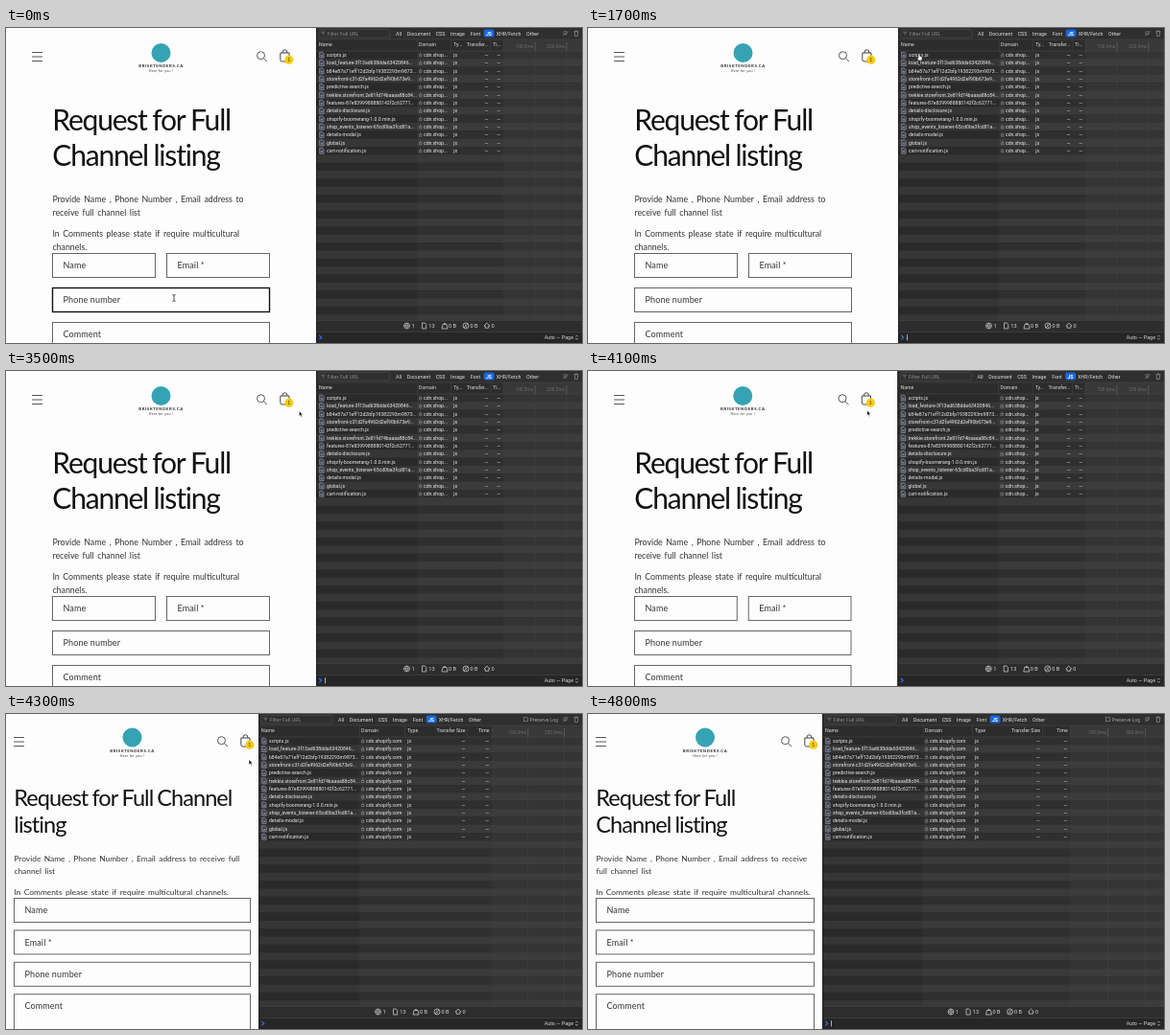
Animation, 600 px wide and 329 px high, one loop 5000 ms. Source, as an HTML page with a canvas:

```html
<!DOCTYPE html>
<html lang="en">
<head>
<meta charset="utf-8">
<title>Request form beside a network inspector</title>
<style>
html, body { margin: 0; height: 100%; overflow: hidden; background: #fdfdfd; }
canvas { display: block; width: 600px; height: 329px; }
</style>
</head>
<body>
<canvas id="stage"></canvas>
<script>
const W = 600, H = 329, LOOP = 5000, TICK = 100;
const canvas = document.getElementById('stage');
const dpr = window.devicePixelRatio || 1;
canvas.width = W * dpr;
canvas.height = H * dpr;
const c = canvas.getContext('2d');

const PAGE = 'Lato, sans-serif', UI = 'Roboto, sans-serif';
const FILES = [
  'scripts.js', 'load_feature-3f13ad638dda63420846...', 'b84e87a71eff12d2bfp19382293m9873...',
  'storefront-c31d2fa4962d2ef90b673e9...', 'predictive-search.js',
  'trekkie.storefront.2e81fd74baaaa88c84...', 'features-87e8399988880142f2c62771...',
  'details-disclosure.js', 'shopify-boomerang-1.0.0.min.js',
  'shop_events_listener-65cd0ba3fcd81a...', 'details-modal.js', 'global.js', 'cart-notification.js'
];
const FILTERS = [['All', 86], ['Document', 107], ['CSS', 129.5], ['Image', 147.5],
  ['Font', 166], ['XHR/Fetch', 200.5], ['Other', 225.5]];

// Keys are [time, value, ...]; values are interpolated linearly.
const SPLIT = [[0, 323], [4000, 323], [4100, 322.5], [4200, 295], [4300, 263], [4400, 249], [4500, 244]];
const POINTER = [[0, 175, 282], [200, 185, 284], [600, 331, 322], [1200, 331, 322], [1600, 345, 29],
  [1700, 345, 27], [1800, 330, 41], [1900, 327, 41], [2100, 327, 41], [2400, 320, 42.5],
  [3300, 320, 42.5], [3700, 290.5, 41], [4100, 290.5, 41], [4300, 253, 47.5], [4500, 244, 49]];

function at(keys, t) {
  const i = keys.findIndex(k => k[0] > t);
  if (i < 0) return keys[keys.length - 1].slice(1);
  const a = keys[i - 1], b = keys[i], f = (t - a[0]) / (b[0] - a[0]);
  return a.slice(1).map((v, j) => v + (b[j + 1] - v) * f);
}

function text(s, x, y, size, color, { font = UI, align = 'left', space = 0, word = 0, style = '' } = {}) {
  c.font = `${style} ${size}px ${font}`;
  c.letterSpacing = space + 'px';
  c.wordSpacing = word + 'px';
  c.textAlign = align;
  c.fillStyle = color;
  c.fillText(s, x, y);
}

function rect(x, y, w, h, color) {
  c.fillStyle = color;
  c.fillRect(x, y, w, h);
}

function box(x, y, w, h, color, width = 1) {
  c.strokeStyle = color;
  c.lineWidth = width;
  c.strokeRect(x, y, w, h);
}

function path(d, x, y, stroke, width = 1, fill) {
  const p = new Path2D(d);
  c.save();
  c.translate(x, y);
  if (fill) { c.fillStyle = fill; c.fill(p); }
  if (stroke) { c.strokeStyle = stroke; c.lineWidth = width; c.stroke(p); }
  c.restore();
}

function disc(x, y, r, color) {
  c.fillStyle = color;
  c.beginPath();
  c.arc(x, y, r, 0, 7);
  c.fill();
}

function drawHeader(d, small) {
  const up = small ? 1 : 0, side = small ? 19 : 0, mid = d / 2;
  path('M0 -4.5H11M0 0H11M0 4.5H11', 27 - side, 30 - up, '#444', .9);
  disc(mid, 26 - up * 1.5, 10, '#35a3b3');
  text('BRISKTENDERS.CA', mid, 40.7 - up, 4.3, '#222', { font: PAGE, align: 'center', space: .55, style: 'bold' });
  text('Here for you !', mid, 46 - up, 3.8, '#444', { font: PAGE, align: 'center', space: .3, style: 'italic' });
  path('M4 0A4 4 0 1 1 -4 0A4 4 0 1 1 4 0M2.9 2.9L6.5 6.5', d - 57.5 + side, 28.7 - up, '#444', .9);
  const bag = d - 32.6 + side;
  path('M-4.6 -3H4.6V4Q4.6 6 2.6 6H-2.6Q-4.6 6 -4.6 4ZM-2.4 -3V-4Q-2.4 -6.2 0 -6.2Q2.4 -6.2 2.4 -4V-3', bag, 29 - up, '#333', .9);
  disc(bag + 4.4, 33.2 - up, 4.6, '#f6cb10');
  text('1', bag + 4.4, 35 - up, 5, '#333', { font: PAGE, align: 'center' });
}

function field(label, x, y, w, h, focus) {
  box(x + .5, y + .5, w - 1, h, focus ? '#111' : '#666', focus ? 1.4 : 1);
  text(label, x + 11.5, y + 16.2, 9, '#333', { font: PAGE, space: .13 });
}

function drawPage(d, focus) {
  const small = d < 300, wide = d > 255;
  rect(0, 0, d, H, '#fdfdfd');
  drawHeader(d, small);
  const x = small ? 8 : 48, w = d - 2 * x;
  const title = !small ? ['Request for Full', 'Channel listing']
    : wide ? ['Request for Full Channel', 'listing'] : ['Request for Full', 'Channel listing'];
  const size = small ? 23.5 : 30;
  title.forEach((s, i) => text(s, x + .3, small ? 95.5 + 28 * i : 107 + 37 * i, size, '#111',
    { font: PAGE, space: -.04 * size, word: -1 }));

  const body = small
    ? [[wide ? 'Provide Name , Phone Number , Email address to receive full'
        : 'Provide Name , Phone Number , Email address to receive', 154],
      [wide ? 'channel list' : 'full channel list', 167.3],
      ['In Comments please state if require multicultural channels.', 189]]
    : [['Provide Name , Phone Number , Email address to', 182.3], ['receive full channel list', 195.8],
      ['In Comments please state if require multicultural', 218.2], ['channels.', 232]];
  for (const [s, y] of body)
    text(s, x + .4, y, small ? 8.4 : 8.8, '#333', { font: PAGE, word: 1.3 });

  if (small) {
    ['Name', 'Email *', 'Phone number', 'Comment'].forEach((s, i) =>
      field(s, x, 192 + 33.4 * i, w, i < 3 ? 25 : 60));
  } else {
    const half = (w - 11) / 2;
    field('Name', x, 235, half, 25);
    field('Email *', x + half + 11, 235, half, 25);
    field('Phone number', x, 271, w, 25, focus);
    field('Comment', x, 307, w, 60);
  }
}

function drawRows(d, type, size, line, narrow) {
  const pitch = 8.34, top = 24;
  for (let i = 0, y = top; y < 305; i++, y = top + i * pitch) {
    rect(d, y, W - d, pitch, i % 2 ? '#363636' : '#2a2a2a');
    rect(d + 105, y, W - d - 105, pitch, i % 2 ? '#3a3a3a' : '#2f2f2f');
    rect(line, y, W - line, pitch, i % 2 ? '#3c3c3c' : '#343434');
  }
  FILES.forEach((name, i) => {
    const y = top + (i + .5) * pitch, base = y + 1.7;
    path('M-2 -3H1L2.4 -1.6V3H-2Z', d + 5.7, y, '#a9abb4', .6, '#3e424e');
    rect(d + 4.9, y, 2, 1.6, '#8089ac');
    text(name, d + 11, base, 5.1, '#ececec');
    path('M-1.3 -.2H1.3V1.8H-1.3ZM-.8 -.2V-1.2Q0 -2.5 .8 -1.2V-.2', d + 108.7, y, '#9a9a9a', .5);
    text(narrow ? 'cdn.shop...' : 'cdn.shopify.com', d + 112, base, 5.1, '#ececec');
    text('js', type + 3, base, 5.1, '#ececec');
    text('—', size, base, 5.1, '#dcdcdc', { align: 'right' });
    text('—', line - 2.5, base, 5.1, '#dcdcdc', { align: 'right' });
  });
}

function drawStatus(d) {
  const mid = (d + W) / 2, y = 311, ink = '#c4c4c4';
  rect(d, 305, W - d, 12, '#2d2d2d');
  rect(d, 317, W - d, 12, '#262627');
  rect(d, 305, W - d, .6, '#484848');
  rect(d, 317, W - d, .6, '#484848');
  path('M3 0A3 3 0 1 1 -3 0A3 3 0 1 1 3 0M-3 0H3M0 -3Q-2.8 0 0 3Q2.8 0 0 -3', mid - 44, y, ink, .7);
  path('M-2 -3H.8L2.2 -1.5V3H-2Z', mid - 26, y, ink, .8);
  path('M-2 -1.5H2L3 3H-3ZM-1 -1.5A1 1.2 0 1 1 1 -1.5', mid - 4.5, y, ink, .8);
  path('M3 0A3 3 0 1 1 -3 0A3 3 0 1 1 3 0M-2 2L2 -2M-1 -1H0M0 1.2H1.2', mid + 17.5, y, ink, .8);
  path('M-3 0L0 -2.8L3 0H1.8V2.3H-1.8V0Z', mid + 39.5, y, ink, .8);
  [['1', -37.5], ['13', -18], ['0 B', 3.5], ['0 B', 26], ['0', 45.5]].forEach(([s, x]) =>
    text(s, mid + x, y + 2, 5.6, '#d8d8d8', { align: 'center' }));
}

function drawInspector(d, caret) {
  const narrow = d > 300, grow = d - 244;
  const type = 400 + .8 * grow, size = 471 + .4 * grow, line = 502 + .2 * grow;
  rect(d, 0, W - d, H, '#2a2a2a');
  rect(d, 0, W - d, 12, '#2f2f30');
  path('M-2.3 -1.5H2.3M-1.4 0H1.4M-.6 1.5H.6', d + 7.3, 5.7, '#888', .6);
  c.strokeStyle = '#505050';
  c.lineWidth = .6;
  c.beginPath();
  c.roundRect(d + 3, 1.5, 74, 8.5, 2);
  c.stroke();
  text('Filter Full URL', d + 11.5, 7.6, 5.4, '#8c8c8c');
  for (const [s, x] of FILTERS) text(s, d + x, 7.5, 5.3, '#e0e0e0', { align: 'center' });
  c.fillStyle = '#1768e0';
  c.beginPath();
  c.roundRect(d + 174.7, 1.6, 10.8, 8, 2);
  c.fill();
  text('JS', d + 180, 7.5, 5.2, '#fff', { align: 'center', style: 'bold' });
  if (!narrow) {
    box(539.5, 3.7, 4, 4, '#8a8a8a', .7);
    text('Preserve Log', 545.5, 7.5, 5.1, '#a2a2a2');
  }
  path('M-2 -2H1V1H-2ZM-2.6 2.6L2.6 -2.6', 583, 5.7, '#8c8c8c', .6);
  path('M-2.4 -2H2.4M-1.7 -2L-1.4 2.8H1.4L1.7 -2M-.8 -2V-2.8H.8V-2', 594, 5.7, '#a0a0a0', .6);

  rect(d, 12, W - d, 12, '#2c2c2c');
  rect(line, 12, W - line, 12, '#383838');
  const head = '#dedede';
  text('Name', d + 3, 19.3, 5.2, head);
  text('Domain', d + 107, 19.3, 5.2, head);
  text(narrow ? 'Ty...' : 'Type', type + 3, 19.3, 5.2, head);
  text(narrow ? 'Transfer...' : 'Transfer Size', size, 19.3, 5.2, head, { align: 'right' });
  text(narrow ? 'Ti...' : 'Time', line - 2.2, 19.3, 5.2, head, { align: 'right' });

  drawRows(d, type, size, line, narrow);
  for (const x of [d + 105, type, size + 2, line]) rect(x, 12, .6, 12, '#444');
  for (const k of [1, 2]) {
    const x = line + (W - line) * .4 * k;
    rect(x, 15, .7, 9, '#666');
    rect(x, 24, .6, 281, '#424242');
    text(k + '00.0ms', x - 1.5, 20.5, 4.8, '#6c6c6c', { align: 'right' });
  }
  rect(d, 11.7, W - d, .6, '#454545');
  rect(d, 23.7, W - d, .6, '#484848');
  drawStatus(d);
  path('M-1.2 -2.2L1.2 0L-1.2 2.2', d + 4.5, 323.2, '#2b6fe8', 1.2);
  if (caret) rect(d + 9, 320.3, .8, 6, '#d8d8d8');
  text('Auto — Page', 591, 325.2, 5.4, '#d6d6d6', { align: 'right' });
  path('M-1.2 -.8L0 -2.2L1.2 -.8M-1.2 .8L0 2.2L1.2 .8', 594.5, 323.2, '#c8c8c8', .7);
  rect(d, 0, .8, H, '#1c1c1c');
}

function drawPointer(t, d) {
  const [x, y] = at(POINTER, t);
  if (t < 1300) {
    if (x < d) path('M-1.6 -3.4Q0 -3.4 0 -2.4V2.4Q0 3.4 -1.6 3.4M1.6 -3.4Q0 -3.4 0 -2.4M0 2.4Q0 3.4 1.6 3.4', x, y, '#222', .8);
  } else if (t > 1500 && t < 1800) {
    path('M-1 0Q0 -1 .8 0V2.4L3.2 3V5.2L2.4 7H-.8L-2.6 4.2L-1 4.4Z', x, y, '#111', .6, '#fff');
  } else if (t < 4400) {
    path('M0 0V5.6L1.4 4.4L2.3 6.4L3.3 6L2.4 4H4.1Z', x, y, '#fff', .7, '#000');
  }
}

function frame(now) {
  const t = Math.floor(now % LOOP / TICK) * TICK;
  const [d] = at(SPLIT, t);
  c.setTransform(dpr, 0, 0, dpr, 0, 0);
  drawPage(d, t < 600);
  if (t >= 700 && t < 1400) rect(0, 0, d, 1, '#d2d2d2');
  drawInspector(d, t > 1300 && (t - 1370) % 1060 < 530);
  drawPointer(t, d);
  requestAnimationFrame(frame);
}
requestAnimationFrame(frame);
</script>
</body>
</html>
```
